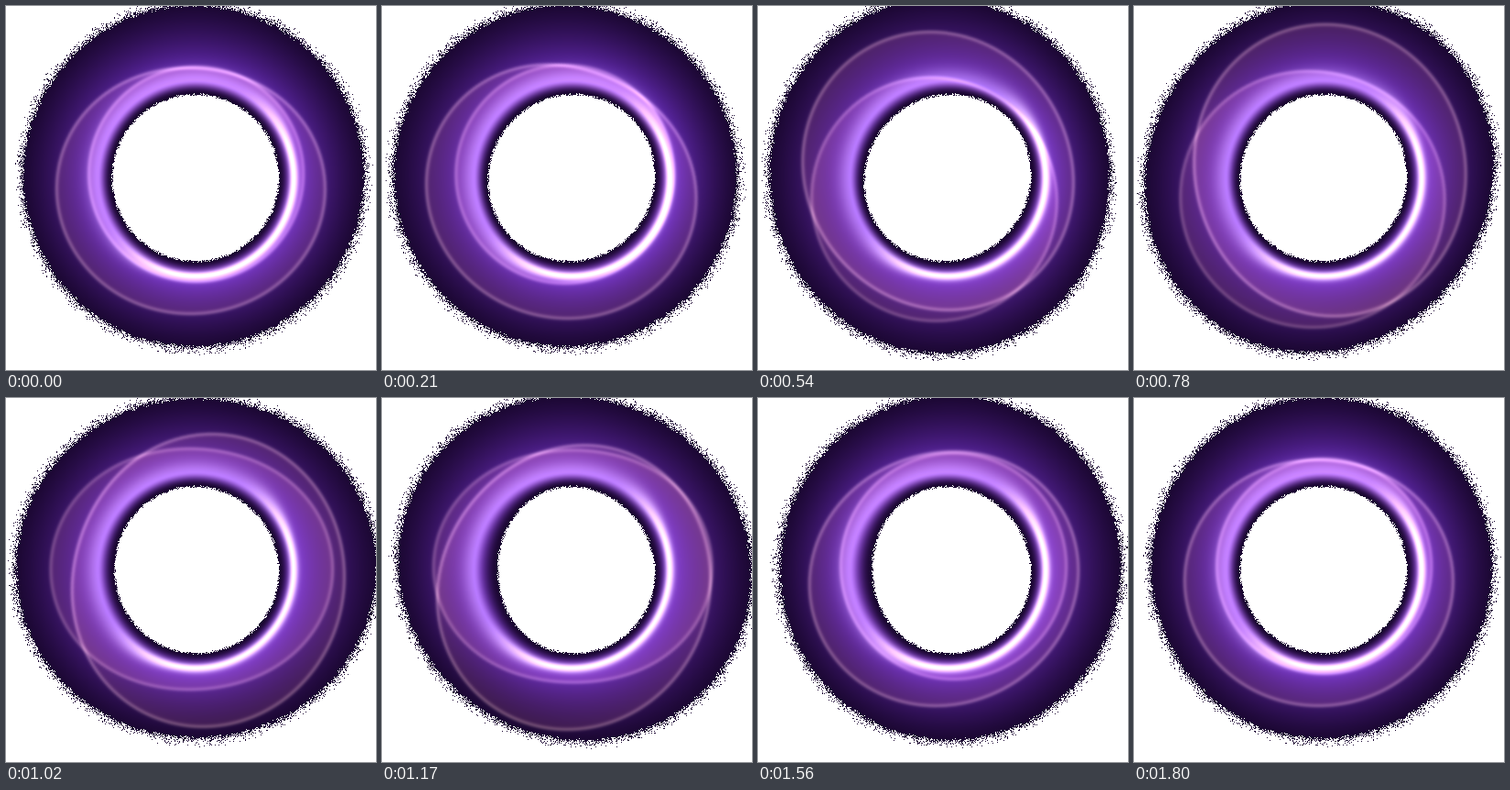
Animation, 404 px wide and 397 px high, one loop 1.83 s. Source, as an HTML page with a canvas:

```html
<!DOCTYPE html>
<html lang="en">
<head>
<meta charset="utf-8">
<title>Violet ring</title>
<style>
html, body { margin: 0; width: 100%; height: 100%; overflow: hidden; background: #fff; }
canvas { display: block; }
</style>
</head>
<body>
<canvas id="stage" width="404" height="397"></canvas>
<script>
const W = 404, H = 397, CX = 206.5, CY = 187;
const LOOP = 1830, STEP = 30, PERIOD = 1800;
const RING = 107, BINS = 1024, TURN = 2 * Math.PI;

const rad = deg => deg * Math.PI / 180;
const cos = Math.cos, sin = Math.sin;
const clamp = x => Math.max(0, Math.min(1, x));
const smooth = (a, b, x) => { const u = clamp((x - a) / (b - a)); return u * u * (3 - 2 * u); };
// One swell per turn, centred on the given angle.
const bump = (angle, deg) => Math.max(0, cos(angle - rad(deg))) ** 2;

// Each shape takes the phase p of the loop and gives a radius for the angle a.
function edgeShape(p) {
  const size = 189.5 - 2.5 * cos(p), x = -2 - 7 * sin(p), oval = 6 * sin(p / 2) ** 2;
  return a => size + x * cos(a) - 2 * sin(a) + oval * cos(2 * a - 2 * p + rad(50));
}

// A lobe that goes round once per loop, slow at first and then catching up.
function outerShape(p) {
  const lead = rad(144) + p - rad(34) * cos(p) - rad(50) * sin(p);
  const size = 147 - 7 * cos(p), lobe = 15 + 5 * sin(2 * p);
  return a => size + lobe * cos(a - lead) + 6 * cos(2 * a - p);
}

// Swells downwards, flattens to a wide oval, then shrinks onto the ring.
function innerShape(p) {
  const size = 130 + 13 * cos(p - rad(190));
  const x = -4 - 11 * sin(p - rad(25)), y = -4 + 33 * bump(p, 132), oval = 13 * bump(p, 225);
  return a => size + x * cos(a) + y * sin(a) + oval * cos(2 * a);
}

// Nearly round, with a dent on the left late in the loop.
function holeShape(p) {
  const dent = 16 * bump(p, 270), oval = 2 * sin(p);
  return a => 91 - dent * bump(a, 188) + oval * cos(2 * a - rad(270));
}

const sample = shape => Float32Array.from({ length: BINS }, (_, b) => shape(b / BINS * TURN));

// Polar place and ragged-edge grain of each pixel.
const radius = new Float32Array(W * H), bin = new Uint16Array(W * H), grain = new Float32Array(W * H);
let seed = 7;
for (let i = 0; i < W * H; i++) {
  const dx = i % W - CX, dy = Math.floor(i / W) - CY;
  radius[i] = Math.hypot(dx, dy);
  bin[i] = Math.round((Math.atan2(dy, dx) / TURN + 1) * BINS) % BINS;
  seed = (Math.imul(seed, 1664525) + 1013904223) >>> 0;
  grain[i] = seed / 4294967296;
}

// The ring is sharp and white at the lower right, wide and soft at the upper left.
const sharp = sample(a => smooth(-0.35, 0.6, cos(a - 0.75)));

const ctx = document.getElementById("stage").getContext("2d");
const image = ctx.createImageData(W, H), px = image.data;

// Veil: a thin bright rim with light fading inwards.
const rim = d => Math.abs(d) < 8 ? Math.exp(-d * d / 6) : 0;
const veil = d => d < -4 ? 0 : Math.exp(-Math.max(0, d) / 42) * smooth(-4, 3, d);

function draw(t) {
  const p = t / PERIOD * TURN;
  const [edge, outer, inner, hole] = [edgeShape, outerShape, innerShape, holeShape].map(f => sample(f(p)));
  for (let i = 0, o = 0; i < W * H; i++, o += 4) {
    const r = radius[i], b = bin[i], g = grain[i];
    if (r > edge[b] - 3 + 7 * g + 6 * g ** 8 || r < hole[b] - 1.5 + 3 * g) {
      px[o + 3] = 0;
      continue;
    }
    const s = sharp[b], d = r - RING;
    const glow = Math.pow(1 - clamp(d / (edge[b] - RING)), 1.2);
    const halo = Math.exp(-Math.abs(d) / 16);
    const width = d < 0 ? 6 - 2.5 * s : 9 - 5.3 * s;
    const core = Math.exp(-d * d / (2 * width * width)) * (0.3 + 0.8 * s);
    const line = rim(r - outer[b]) + 0.75 * rim(r - inner[b]);
    const fill = veil(outer[b] - r) + veil(inner[b] - r);
    const lit = smooth(hole[b] + 1, RING - 0.5, r);
    px[o] = 27 + lit * (74 * glow + 18 * halo + 145 * core + 50 * line + 29 * fill);
    px[o + 1] = 7 + lit * (32 * glow + 18 * halo + 170 * core + 46 * line + 18 * fill);
    px[o + 2] = 50 + lit * (125 * glow + 45 * halo + 80 * core + 36 * line + 16 * fill);
    px[o + 3] = 255;
  }
  ctx.putImageData(image, 0, 0);
}

let shown = -1;
function tick() {
  const t = Math.floor(performance.now() % LOOP / STEP) * STEP;
  if (t !== shown) {
    shown = t;
    draw(t % PERIOD);
  }
  requestAnimationFrame(tick);
}
tick();
</script>
</body>
</html>
```
